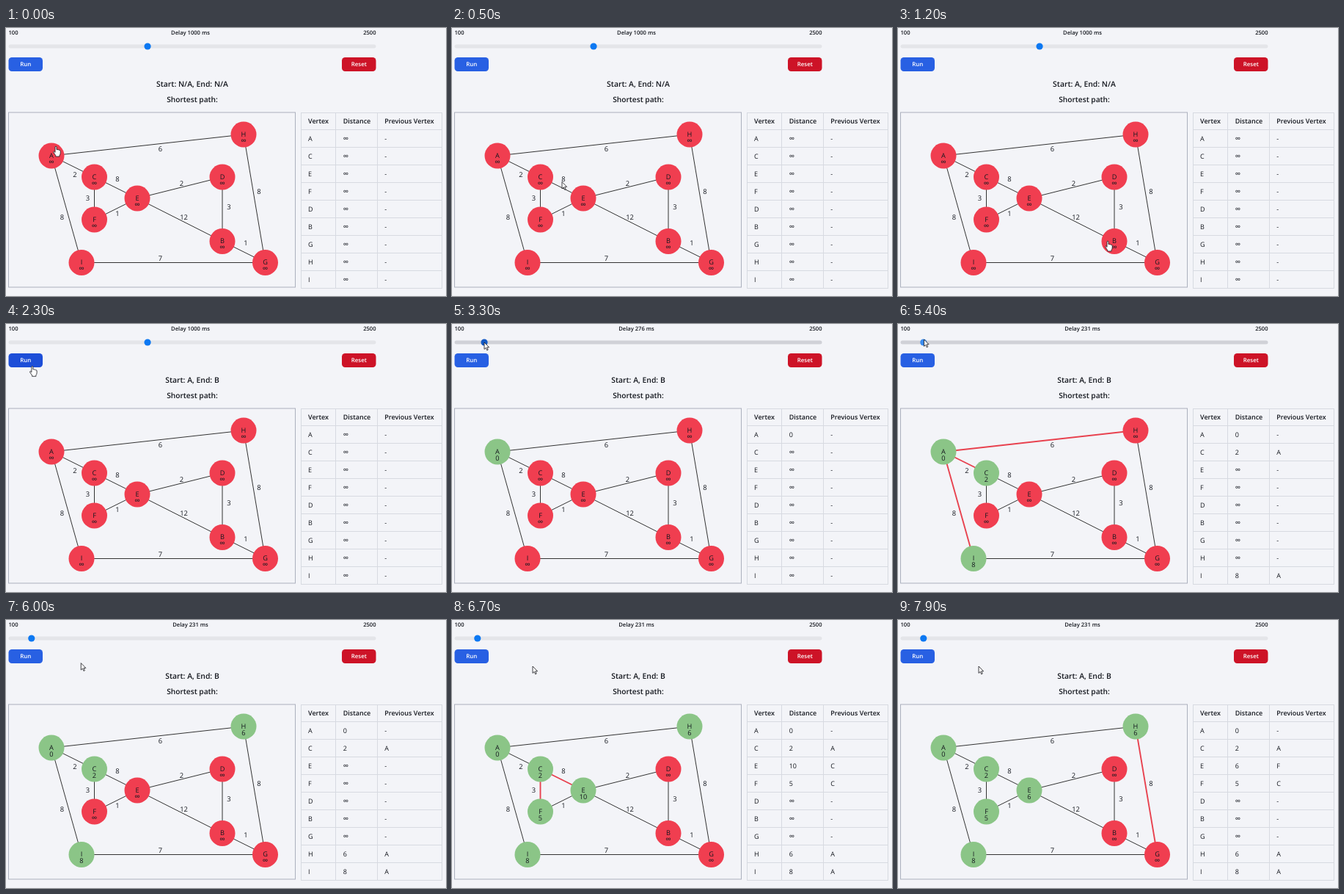
An HTML page that plays this animation: 600x365 px, repeating every 8 s.

```html
<!DOCTYPE html>
<html lang="en">
<head>
<meta charset="utf-8">
<title>Shortest path</title>
<style>
html, body { margin: 0; width: 100%; height: 100%; overflow: hidden; background: #f3f4f8; }
svg { display: block; width: 600px; height: 365px; }
text { font-family: "Open Sans", "Noto Sans", sans-serif; fill: #15181f; text-rendering: geometricPrecision; }
.bold { font-weight: 600; }
.mid { text-anchor: middle; }
.end { text-anchor: end; }
</style>
</head>
<body>
<svg id="stage" viewBox="0 0 600 365" xmlns="http://www.w3.org/2000/svg"></svg>
<script>
const LOOP = 8000, TICK = 100;
const RED = '#f03e50', GREEN = '#8bc587', INF = '∞';
const stage = document.getElementById('stage');

function add(tag, attrs, text) {
  const el = document.createElementNS('http://www.w3.org/2000/svg', tag);
  for (const k in attrs) el.setAttribute(k, attrs[k]);
  if (text !== undefined) el.textContent = text;
  stage.appendChild(el);
  return el;
}
const set = (el, attrs) => { for (const k in attrs) el.setAttribute(k, attrs[k]); };
const label = (x, y, size, cls, text) => add('text', { x, y, 'font-size': size, class: cls }, text);
const line = (x1, y1, x2, y2, stroke) => add('line', { x1, y1, x2, y2, stroke, 'stroke-width': 1 });

function setValue(el, v, size) {
  el.textContent = v;
  el.setAttribute('font-size', v === INF ? size * 1.15 : size);
}

// Slider and buttons
label(3.5, 9.2, 7.6, 'bold', '100');
label(504.5, 9.2, 7.6, 'bold end', '2500');
const delayText = label(251.5, 9.2, 7.6, 'bold mid', '');
const track = add('rect', { x: 3.5, y: 22.5, width: 501, height: 5, rx: 2.5 });
const thumb = add('circle', { cy: 25, r: 4.6 });

const button = (x, w, fill, text) => {
  const box = add('rect', { x, y: 40, width: w, height: 19, rx: 4.5, fill });
  label(x + w / 2, 52.4, 7.9, 'bold mid', text).style.fill = '#fff';
  return box;
};
const run = button(3.5, 46.5, '#2860e3', 'Run');
button(458, 46.5, '#cd1327', 'Reset');

const startText = label(254, 80.3, 10.4, 'bold mid', '');
label(254, 101.3, 10.2, 'bold mid', 'Shortest path:');

// Graph
add('rect', { x: 3.5, y: 115, width: 391, height: 238, fill: 'none', stroke: '#abb0bd' });

const nodes = {
  A: { x: 62, y: 174 }, C: { x: 120.5, y: 203 }, E: { x: 179, y: 232 },
  F: { x: 120.5, y: 261 }, D: { x: 295, y: 203 }, B: { x: 295, y: 290.5 },
  G: { x: 353.5, y: 319.5 }, H: { x: 324, y: 145 }, I: { x: 103, y: 319.5 }
};
const edges = {};
[
  ['AH', 6, 210.5, 165], ['AC', 2, 94, 200], ['AI', 8, 76.5, 258], ['CE', 8, 152, 206],
  ['CF', 3, 111.5, 232], ['FE', 1, 152, 252.5], ['ED', 2, 239.5, 211.5], ['EB', 12, 242.5, 258],
  ['DB', 3, 304, 244], ['BG', 1, 327, 293], ['HG', 8, 345, 223], ['IG', 7, 210.5, 314]
].forEach(([id, weight, x, y]) => {
  const a = nodes[id[0]], b = nodes[id[1]];
  edges[id] = line(a.x, a.y, b.x, b.y, '#333');
  label(x, y + 3.3, 9.4, 'mid', weight);
});
for (const id in nodes) {
  const n = nodes[id];
  n.disc = add('circle', { cx: n.x, cy: n.y, r: 17.5 });
  label(n.x, n.y + 2.8, 9.2, 'mid', id);
  n.value = label(n.x, n.y + 11.5, 9.2, 'mid', INF);
}

// Table
const ROW = 23.93, TOP = 115, COLS = [412, 459.7, 516.3];
for (let i = 0; i <= 10; i++) {
  const y = Math.floor(TOP + i * ROW) + 0.5;
  line(402, y, 595, y, '#d7dae1');
}
[402.5, 449.5, 506.5, 594.5].forEach(x => line(x, 115, x, 354.5, '#d7dae1'));
['Vertex', 'Distance', 'Previous Vertex'].forEach((s, i) => label(COLS[i], 130.4, 9, 'bold', s));
Object.keys(nodes).forEach((id, i) => {
  const y = TOP + (i + 1.5) * ROW + 3.5;
  label(COLS[0], y, 9, '', id);
  nodes[id].dist = label(COLS[1], y, 9, '', INF);
  nodes[id].prev = label(COLS[2], y, 9, '', '-');
});

// Pointer
const outline = { fill: '#fff', stroke: '#15151a', 'stroke-width': 0.8, 'stroke-linejoin': 'round' };
const arrow = add('path', { d: 'M0 0V9.4L2.2 7.4L3.7 10.8L5.2 10.1L3.7 6.8H6.6Z', ...outline });
const hand = add('path', {
  d: 'M-1 .8Q0 -.8 1 .8V4.6Q2 3.8 2.8 4.9Q3.9 4.3 4.5 5.4Q6 5 6.2 6.7V9.4Q6 11.5 5 12.4V14H-.3V12.6L-3 8.8Q-3.8 7.2-2.6 6.9L-1 8.4Z',
  ...outline
});

// Timeline
const settled = [
  [2600, 'A', 0, '-'], [3900, 'C', 2, 'A'], [4600, 'I', 8, 'A'], [5600, 'H', 6, 'A'],
  [6300, 'F', 5, 'C'], [6700, 'E', 10, 'C'], [7400, 'E', 6, 'F']
];
const lit = [
  ['AC', 3600, 5800], ['AI', 4200, 5800], ['AH', 5300, 5800], ['CF', 6100, 7000],
  ['CE', 6500, 7000], ['FE', 7200, 7700], ['HG', 7900, LOOP]
];
const pointerPath = [
  [0, 68, 161], [1200, 286, 290], [1500, 286, 290], [2400, 27, 49], [2800, 27, 49],
  [3200, 44, 25], [3600, 44, 25], [4300, 137, 23.5], [4700, 137, 23.5],
  [5300, 35.5, 21], [5600, 35.5, 21], [6100, 110, 63], [LOOP, 110, 63]
];
const delayPath = [
  [0, 1000], [3199, 1000], [3200, 276], [3600, 276], [4300, 728], [4700, 728], [5300, 231], [LOOP, 231]
];

function along(path, t) {
  let i = 1;
  while (i < path.length - 1 && t >= path[i][0]) i++;
  const a = path[i - 1], b = path[i];
  const u = Math.min(1, (t - a[0]) / (b[0] - a[0]));
  const s = u * u * (3 - 2 * u);
  return a.slice(1).map((v, k) => v + (b[k + 1] - v) * s);
}
const between = (t, a, b) => t >= a && t < b;

function draw(t) {
  const [px, py] = along(pointerPath, t);
  const delay = Math.round(along(delayPath, t)[0]);

  delayText.textContent = `Delay ${delay} ms`;
  startText.textContent = `Start: ${t < 200 ? 'N/A' : 'A'}, End: ${t < 1600 ? 'N/A' : 'B'}`;

  const onSlider = between(py, 20, 30) && between(px, 3, 505);
  const held = between(t, 3200, 3300) || between(t, 3600, 5500);
  set(track, { fill: onSlider ? '#d0d1d7' : '#e4e5e9' });
  set(thumb, {
    cx: 7.8 + (delay - 100) / 2400 * 494,
    fill: held ? '#3a8bee' : onSlider ? '#1259c4' : '#0c78f2'
  });

  const onRun = between(px, 3.5, 50) && between(py, 40, 59);
  set(run, { fill: onRun ? '#1d4ed8' : '#2860e3' });

  const state = {};
  for (const [at, id, dist, prev] of settled) if (t >= at) state[id] = [dist, prev];
  let onNode = false;
  for (const id in nodes) {
    const n = nodes[id], [dist, prev] = state[id] || [INF, '-'];
    set(n.disc, { fill: state[id] ? GREEN : RED });
    setValue(n.value, dist, 9.2);
    setValue(n.dist, dist, 9);
    n.prev.textContent = prev;
    if (Math.hypot(px - n.x, py - n.y) < 17.5) onNode = true;
  }

  for (const id in edges) {
    const on = lit.some(([e, a, b]) => e === id && between(t, a, b));
    set(edges[id], { stroke: on ? '#e8424f' : '#333', 'stroke-width': on ? 1.9 : 1 });
  }

  const pointing = onNode || onRun;
  const transform = `translate(${px} ${py})`;
  set(hand, { transform, visibility: pointing ? 'visible' : 'hidden' });
  set(arrow, { transform, visibility: pointing ? 'hidden' : 'visible' });
}

const begin = performance.now();
function loop() {
  const t = (performance.now() - begin) % LOOP;
  draw(Math.floor(t / TICK) * TICK);
  requestAnimationFrame(loop);
}
loop();
</script>
</body>
</html>
```
